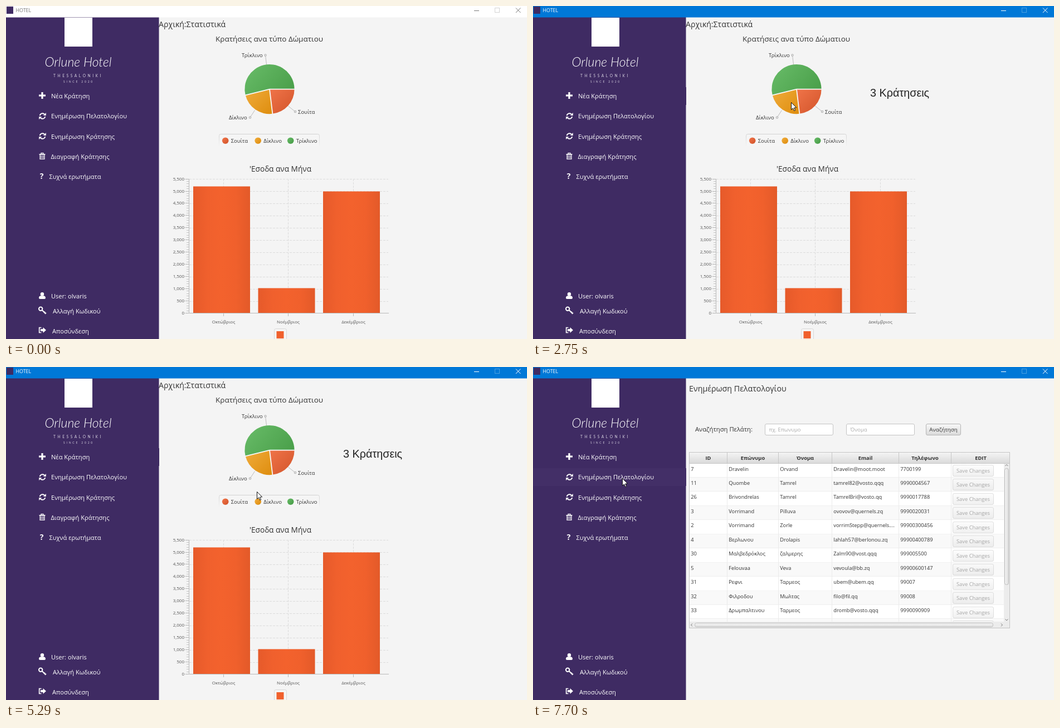
An HTML page with a canvas for the animation above (8000 ms loop, 935 by 599 pixels).

```html
<!DOCTYPE html>
<html lang="el">
<head>
<meta charset="utf-8">
<title>Hotel</title>
<style>
html, body { margin: 0; width: 100%; height: 100%; overflow: hidden; background: #f4f4f4; }
canvas { display: block; }
</style>
</head>
<body>
<canvas id="stage" width="935" height="599"></canvas>
<script>
const ctx = document.getElementById('stage').getContext('2d');
const LOOP = 8000;
const UI = '"Open Sans", "Noto Sans", sans-serif';
const PURPLE = '#3f2b63';
const HOVER = '#432f67';
const TAU = Math.PI * 2;

// Pointer stops: time, x, y
const PATH = [
  [110, 906, 601], [260, 850, 530], [500, 640, 300], [860, 461, 125],
  [1480, 461, 125], [1840, 456, 173], [2700, 456, 173], [2750, 463, 173],
  [3000, 488, 156], [3360, 496, 163], [3620, 496, 163], [3810, 463, 283],
  [4080, 409, 404], [4610, 409, 404], [4830, 506, 466], [5140, 466, 214],
  [5290, 450, 224], [5410, 449, 234], [5430, 449, 234], [5700, 409, 246],
  [6000, 466, 252], [6210, 478, 240], [6240, 478, 240], [6400, 525, 236],
  [6580, 483, 243], [7040, 190, 212], [7120, 190, 212], [7230, 170, 175],
  [7340, 160, 200], [8000, 160, 200]
];
const CLICKS = [[960, 1040], [2130, 2230], [4320, 4470], [7490, 7700]];

const SLICES = [
  { name: 'Σουίτα', count: 3, light: '#f07449', dark: '#d2542a' },
  { name: 'Δίκλινο', count: 3, light: '#f0ac3c', dark: '#de8d0e' },
  { name: 'Τρίκλινο', count: 7, light: '#66ba66', dark: '#479c47' }
];
const BARS = [['Οκτώβριος', 336, 324.5], ['Νοέμβριος', 452.5, 507.5], ['Δεκέμβριος', 569, 333.5]];

const COLUMNS = [280, 348, 440, 536, 656, 750, 856];
const HEADS = ['ID', 'Επώνυμο', 'Όνομα', 'Email', 'Τηλέφωνο', 'EDIT'];
const GUESTS = [
  ['7', 'Dravelin', 'Orvand', 'Dravelin@moot.moot', '7700199'],
  ['11', 'Quombe', 'Tamrel', 'tamrel82@vosto.qqq', '9990004567'],
  ['26', 'Brivondrelas', 'Tamrel', 'TamrelBri@vosto.qq', '9990017788'],
  ['3', 'Vorrimand', 'Pilluva', 'ovovov@quernels.zq', '9990020031'],
  ['2', 'Vorrimand', 'Zorle', 'vorrimStepp@quernels....', '99900300456'],
  ['4', 'Βερλωνου', 'Drolapis', 'lahlah57@berlonou.zq', '99900400789'],
  ['30', 'Μαλβεδρόκλος', 'ζαλμερης', 'Zalm90@vost.qqq', '999005500'],
  ['5', 'Felouvaa', 'Veva', 'vevoula@bb.zq', '99900600147'],
  ['31', 'Ρεφνι', 'Ταρμεος', 'ubem@ubem.qq', '99007'],
  ['32', 'Φιλροδου', 'Μωλτας', 'filo@fil.qq', '99008'],
  ['33', 'Δρωμπαλτινου', 'Ταρμεος', 'dromb@vosto.qqq', '9990090909']
];

function text(str, x, y, size, color = '#333', align = 'left', style = '', family = UI) {
  ctx.font = `${style} ${size}px ${family}`;
  ctx.textAlign = align;
  ctx.fillStyle = color;
  ctx.fillText(str, x, y);
}

function rect(x, y, w, h, color) {
  ctx.fillStyle = color;
  ctx.fillRect(x, y, w, h);
}

function box(x, y, w, h, r, fill, stroke) {
  ctx.beginPath();
  ctx.roundRect(x, y, w, h, r);
  if (fill) { ctx.fillStyle = fill; ctx.fill(); }
  if (stroke) { ctx.strokeStyle = stroke; ctx.lineWidth = 1; ctx.stroke(); }
}

function poly(points, stroke, width = 1) {
  ctx.beginPath();
  points.forEach(([x, y]) => ctx.lineTo(x, y));
  if (stroke) {
    ctx.strokeStyle = stroke;
    ctx.lineWidth = width;
    ctx.stroke();
  } else ctx.fill();
}

function dot(x, y, r, fill) {
  ctx.beginPath();
  ctx.arc(x, y, r, 0, TAU);
  ctx.fillStyle = fill;
  ctx.fill();
}

function gradient(x0, y0, x1, y1, ...colors) {
  const g = ctx.createLinearGradient(x0, y0, x1, y1);
  colors.forEach((c, i) => g.addColorStop(i / (colors.length - 1), c));
  return g;
}

function titleBar(active) {
  rect(0, 0, 935, 20.5, active ? '#0078d7' : '#fff');
  rect(1, 1, 12, 13, PURPLE);
  const ink = active ? '#fff' : '#777';
  text('HOTEL', 17.5, 11.3, 8.9, ink);
  poly([[840, 8.5], [849, 8.5]], ink);
  ctx.strokeStyle = active ? '#4a9fe0' : '#d4d4d4';
  ctx.strokeRect(877.5, 3.5, 8, 8);
  poly([[915, 3.5], [923.5, 12]], ink);
  poly([[923.5, 3.5], [915, 12]], ink);
}

const ICONS = {
  plus() {
    ctx.fillRect(-6, -1.6, 12, 3.2);
    ctx.fillRect(-1.6, -6, 3.2, 12);
  },
  refresh() {
    ctx.lineWidth = 2;
    for (let i = 0; i < 2; i++) {
      ctx.beginPath();
      ctx.arc(0, 0, 4.8, Math.PI * 1.06, Math.PI * 1.78);
      ctx.stroke();
      poly([[6.3, -6], [6.3, -1], [1.3, -1]]);
      ctx.rotate(Math.PI);
    }
  },
  trash() {
    ctx.fillRect(-5.5, -4, 11, 1.4);
    ctx.lineWidth = 1.2;
    ctx.strokeRect(-2, -5.5, 4, 2);
    ctx.strokeRect(-4, -3, 8, 8.3);
    for (const x of [-2.2, 0, 2.2]) ctx.fillRect(x - 0.5, -1.3, 1, 5.2);
  },
  help() {
    text('?', 0, 5, 14, '#fff', 'center', 'bold');
  },
  user() {
    dot(0, -2.8, 3.2, '#fff');
    ctx.beginPath();
    ctx.roundRect(-6, 0.2, 12, 5.8, [4, 4, 2, 2]);
    ctx.fill();
  },
  key() {
    ctx.lineWidth = 2;
    ctx.beginPath();
    ctx.arc(-2.8, -2.2, 3.2, 0, TAU);
    ctx.stroke();
    poly([[-0.4, 0], [6, 6]], '#fff', 2);
    poly([[3, 4.8], [5, 2.8]], '#fff', 1.8);
    poly([[5, 6.8], [7, 4.8]], '#fff', 1.8);
  },
  exit() {
    poly([[-1.5, -4.5], [-5.3, -4.5], [-5.3, 4.5], [-1.5, 4.5]], '#fff', 1.7);
    poly([[-3, -2], [1.5, -2], [1.5, -5], [7, 0], [1.5, 5], [1.5, 2], [-3, 2]]);
  }
};

const MENU = [
  ['plus', 65, 161, 'Νέα Κράτηση', 81, 166],
  ['refresh', 65.5, 198, 'Ενημέρωση Πελατολογίου', 81, 202],
  ['refresh', 65.5, 234, 'Ενημέρωση Κράτησης', 81, 238.5],
  ['trash', 65, 270, 'Διαγραφή Κράτησης', 80.5, 274.5],
  ['help', 64, 306, 'Συχνά ερωτήματα', 77.5, 311],
  ['user', 65, 521, 'User: olvaris', 81, 526],
  ['key', 65, 547, 'Αλλαγή Κωδικού', 84, 552.5],
  ['exit', 65, 583, 'Αποσύνδεση', 83, 588.5]
];

function sidebar([px, py]) {
  rect(0, 20, 274.5, 579, PURPLE);
  rect(105, 21, 50, 52, '#fff');
  text('Orlune Hotel', 129.5, 109, 23, '#fff', 'center', 'italic 300', 'Lato, sans-serif');
  ctx.letterSpacing = '3.6px';
  text('THESSALONIKI', 85, 128, 6.6, '#d9d4e2', 'left', '', 'Lato, sans-serif');
  ctx.letterSpacing = '2.8px';
  text('SINCE 2020', 103, 138, 5, '#d9d4e2', 'left', '', 'Lato, sans-serif');
  ctx.letterSpacing = '0px';
  for (const [icon, ix, iy, label, x, y] of MENU) {
    const top = y - 20;
    if (px < 275 && py >= top && py < top + 32) rect(0, top, 275, 32, HOVER);
    ctx.save();
    ctx.translate(ix, iy);
    ctx.fillStyle = ctx.strokeStyle = '#fff';
    ICONS[icon]();
    ctx.restore();
    text(label, x, y, 11.1, '#fff');
  }
}

function callout(label, x, y, from, to) {
  poly([from, to], '#bbb');
  dot(...from, 2.2, '#b5b5b5');
  dot(...from, 1.1, '#f4f4f4');
  text(label, x, y, 9.5);
}

function pie() {
  const cx = 473, cy = 149.6, r = 44.6;
  text('Κρατήσεις ανα τύπο Δώματιου', 472.5, 64, 13.5, '#333', 'center');
  const total = SLICES.reduce((sum, s) => sum + s.count, 0);
  const areas = [[473, 149, 518, 194], [430, 149, 478, 194], [436, 108, 510, 172]];
  let angle = 0;
  SLICES.forEach((s, i) => {
    const end = angle + s.count / total * TAU;
    ctx.beginPath();
    ctx.moveTo(cx, cy);
    ctx.arc(cx, cy, r, angle, end);
    ctx.closePath();
    ctx.fillStyle = gradient(...areas[i], s.light, s.dark);
    ctx.fill();
    angle = end;
  });
  angle = 0;
  for (const s of SLICES) {
    poly([[cx, cy], [cx + Math.cos(angle) * (r + 1), cy + Math.sin(angle) * (r + 1)]], '#f8f8f8', 1.8);
    angle += s.count / total * TAU;
  }
  callout('Τρίκλινο', 423, 92, [465.5, 88.5], [467.5, 105]);
  callout('Σουίτα', 524, 194, [519, 190], [506.5, 180]);
  callout('Δίκλινο', 400, 204, [438, 200.5], [446.5, 187.5]);

  box(382.5, 230.5, 180, 24, 3, '#f5f5f5', gradient(0, 230, 0, 253, '#d2d2d2', '#f4f4f4'));
  rect(380, 252, 186, 4, '#f4f4f4');
  [393.7, 452.2, 510.7].forEach((x, i) => {
    const s = SLICES[i];
    dot(x, 242.2, 5.8, gradient(x - 5, 237, x + 5, 247, s.light, s.dark));
    text(s.name, x + 10, 245.6, 9.5);
  });
}

function barChart() {
  const base = 552.5, step = 21.95;
  const middle = x => Math.floor(x + 54) + 0.5;
  text("'Εσοδα ανα Μήνα", 492.5, 298, 13.65, '#333', 'center');
  ctx.setLineDash([4, 2]);
  for (let i = 1; i <= 11; i++) {
    const y = Math.round(base - i * step) + 0.5;
    poly([[329, y], [686, y]], '#dcdcdc');
  }
  for (const [, x] of BARS) poly([[middle(x), 311], [middle(x), 552]], '#dcdcdc');
  ctx.setLineDash([]);
  for (let i = 0; i <= 55; i++) {
    const major = i % 5 === 0;
    const y = Math.round(base - i * step / 5 - 0.5) + 0.5;
    poly([[major ? 321.5 : 324, y], [328, y]], major ? '#b4b4b4' : '#c4c4c4');
    if (major) text((i * 100).toLocaleString('en-US'), 320, y + 2.8, 8, '#555', 'right');
  }
  poly([[328.5, 311], [328.5, 552.5], [687, 552.5]], '#b9b9b9');
  for (const [label, x, top] of BARS) {
    rect(x, top, 102, 552 - top, gradient(x, 0, x + 102, 0, '#e65a2a', '#f0602d', '#f3622d', '#f0602c', '#e35a29'));
    poly([[middle(x), 553], [middle(x), 558]], '#b9b9b9');
    text(label, middle(x), 570.5, 8, '#555', 'center');
  }
  box(481.5, 580.5, 22, 24, 3, '#f5f5f5', '#d8d8d8');
  rect(485.5, 585, 13, 13, '#f0602d');
}

function statistics(t) {
  text('Αρχική:Στατιστικά', 274, 38, 14.1);
  pie();
  barChart();
  if (t >= 1040) {
    const count = SLICES[t < 2230 ? 2 : 1].count;
    text(count + ' Κράτησεις', 605, 163, 19.8, '#222', 'left', '', '"Liberation Sans", sans-serif');
  }
}

function button(x, y, w, h, label, size, alpha = 1) {
  ctx.globalAlpha = alpha;
  box(x, y, w, h, 2.5, gradient(0, y, 0, y + h, '#f8f8f8', '#dadada'), '#b4b4b4');
  text(label, x + w / 2, y + h / 2 + 3.7, size, '#333', 'center');
  ctx.globalAlpha = 1;
}

function field(x, hint) {
  box(x, 102.5, 122, 20, 2.5, '#fff', '#c3c3c3');
  text(hint, x + 7, 116, 9.45, '#aaa');
}

function scrollbars() {
  rect(845, 174, 10, 284, '#ececec');
  rect(281, 458, 574, 11, '#ececec');
  box(846.5, 182.5, 7, 209, 3, gradient(846, 0, 854, 0, '#f6f6f6', '#dcdcdc'), '#bcbcbc');
  box(290.5, 460.5, 535, 7, 3, gradient(0, 460, 0, 468, '#f6f6f6', '#dcdcdc'), '#bcbcbc');
  const ink = '#777';
  poly([[847.5, 178], [850, 175.5], [852.5, 178]], ink);
  poly([[847.5, 453.5], [850, 456], [852.5, 453.5]], ink);
  poly([[286, 461.5], [283.5, 464], [286, 466.5]], ink);
  poly([[840, 461.5], [842.5, 464], [840, 466.5]], ink);
}

function guestTable() {
  const rowH = 25.45, top = 173.5;
  rect(280, 153, 576, 317, '#fff');
  ctx.save();
  ctx.beginPath();
  ctx.rect(281, 173, 564, 285);
  ctx.clip();
  for (let i = 0; i < 12; i++) {
    const y = top + i * rowH;
    rect(281, y, 564, rowH, i % 2 ? '#f9f9f9' : '#fff');
    rect(281, Math.round(y + rowH) - 1, 564, 1, '#eee');
    (GUESTS[i] || []).forEach((value, c) => text(value, COLUMNS[c] + 3.3, y + 13, 9.25));
    button(753.5, Math.round(y + 2.5) + 0.5, 73, 20, 'Save Changes', 9.35, 0.4);
  }
  for (const x of COLUMNS.slice(1, 6)) rect(x, 173, 1, 285, '#ebebeb');
  ctx.restore();
  rect(281, 154, 575, 19, gradient(0, 154, 0, 173, '#f4f4f4', '#dadada'));
  rect(281, 173, 575, 1, '#c8c8c8');
  HEADS.forEach((head, i) => {
    if (i) rect(COLUMNS[i], 154, 1, 19, '#c6c6c6');
    text(head, (COLUMNS[i] + COLUMNS[i + 1]) / 2 + 0.5, 167, 9.3, '#333', 'center', 'bold');
  });
  scrollbars();
  ctx.lineWidth = 1;
  ctx.strokeStyle = '#c4c4c4';
  ctx.strokeRect(280.5, 153.5, 575, 316);
}

function guests() {
  text('Ενημέρωση Πελατολογίου', 280, 43.5, 14.25);
  text('Αναζήτηση Πελάτη:', 291, 116, 11.25);
  field(416.5, 'πχ. Επωνυμο');
  field(562.5, 'Όνομα');
  button(705.5, 102.5, 62, 20, 'Αναζήτηση', 9.7);
  guestTable();
}

// Velocity through a stop; zero where the pointer rests
function slope(i, axis) {
  const a = PATH[i - 1], b = PATH[i], c = PATH[i + 1];
  if (!a || !c) return 0;
  const still = (p, q) => p[1] === q[1] && p[2] === q[2];
  if (still(a, b) || still(b, c)) return 0;
  return (c[axis] - a[axis]) / (c[0] - a[0]);
}

function pointerAt(t) {
  if (t < PATH[0][0]) return PATH[0].slice(1);
  const i = PATH.findIndex(p => p[0] > t) - 1;
  const a = PATH[i], b = PATH[i + 1];
  const span = b[0] - a[0], u = (t - a[0]) / span;
  const u2 = u * u, u3 = u2 * u;
  return [1, 2].map(k => Math.round(
    (2 * u3 - 3 * u2 + 1) * a[k] + (3 * u2 - 2 * u3) * b[k] +
    span * ((u3 - 2 * u2 + u) * slope(i, k) + (u3 - u2) * slope(i + 1, k))));
}

function pointer([x, y], pressed) {
  if (pressed) dot(x, y, 10, 'rgba(255,255,0,.47)');
  ctx.save();
  ctx.translate(x + 0.5, y + 0.5);
  ctx.beginPath();
  [[0, 0], [0, 13], [3, 10.3], [5.2, 15], [7.2, 14.1], [5.1, 9.6], [9.2, 9.3]]
    .forEach(p => ctx.lineTo(...p));
  ctx.closePath();
  ctx.fillStyle = '#fff';
  ctx.fill();
  ctx.strokeStyle = '#111';
  ctx.lineWidth = 1;
  ctx.stroke();
  ctx.restore();
}

function draw(t) {
  const active = t >= 1000;
  const tip = pointerAt(t);
  rect(0, 0, 935, 599, '#f4f4f4');
  ctx.lineWidth = 1;
  sidebar(tip);
  if (active && t < 7340) rect(274, 146, 1, 32, PURPLE);
  titleBar(active);
  if (t < 7700) statistics(t); else guests();
  pointer(tip, CLICKS.some(([from, to]) => t >= from && t < to));
}

const start = performance.now();
function tick() {
  draw((performance.now() - start) % LOOP);
  requestAnimationFrame(tick);
}
tick();
</script>
</body>
</html>
```
